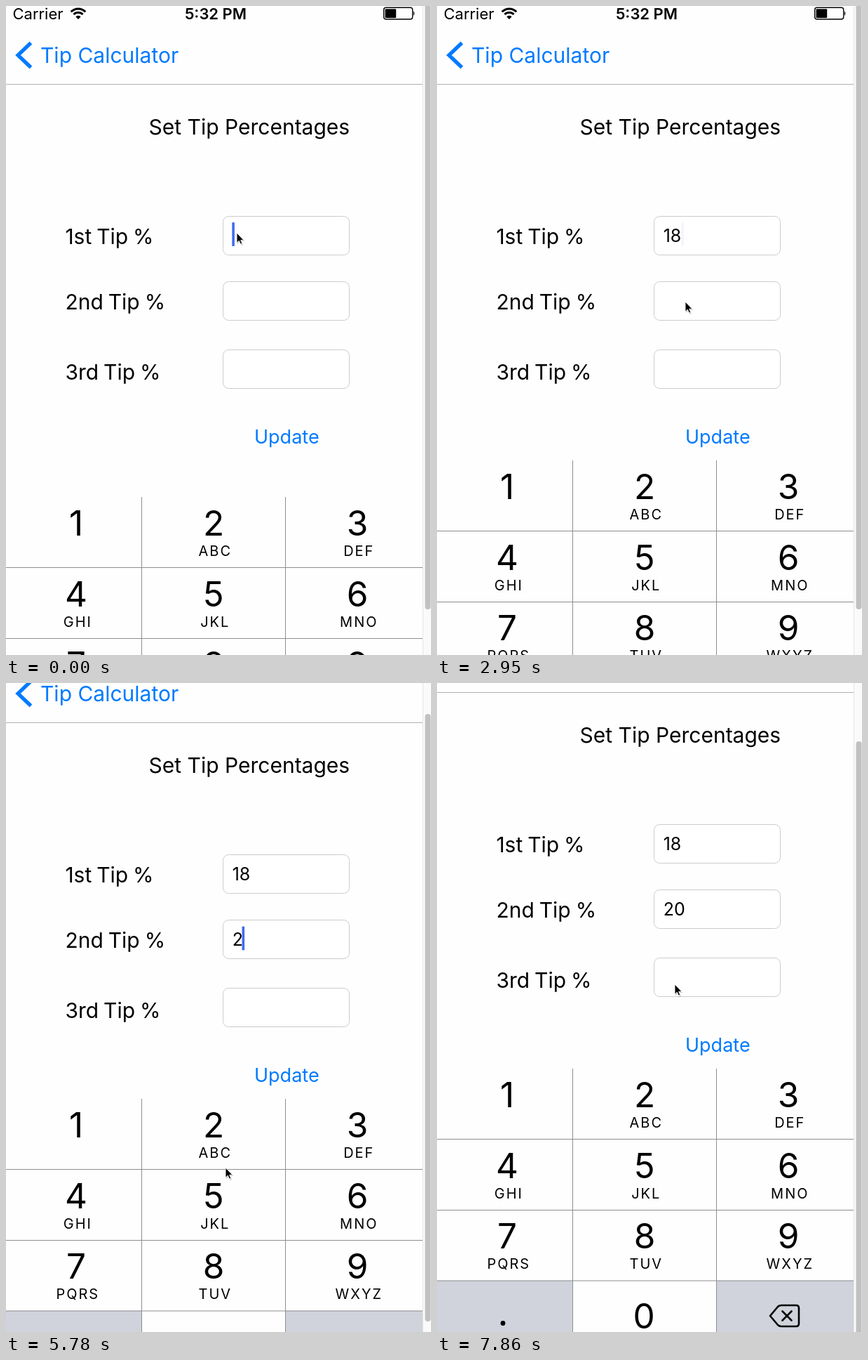
An HTML page for the animation above (8000 ms loop, 606x924 px).

```html
<!DOCTYPE html>
<html lang="en">
<head>
<meta charset="utf-8">
<title>Set Tip Percentages</title>
<style>
  html, body { margin: 0; width: 100%; height: 100%; overflow: hidden; background: #fefefe; }
  svg { display: block; width: 606px; height: 924px; }
  text {
    font-family: Inter, Roboto, "Liberation Sans", sans-serif;
    font-size: 30px;
    font-optical-sizing: none;
    white-space: pre;
  }
  .status { font-size: 22px; }
  .clock { font-weight: 600; text-anchor: middle; }
  .blue { fill: #007aff; }
  .update { font-size: 27px; }
  .label { word-spacing: -1.5px; }
  .entry { font-size: 25px; }
  .field { fill: #fff; stroke: #ccc; }
  .digit { font-size: 49.5px; text-anchor: middle; }
  .letters { font-size: 20px; letter-spacing: 2px; text-anchor: middle; }
  .grid { stroke: #8e8e90; fill: none; }
  .caret { fill: #426bf2; }
  .line { fill: none; stroke: #000; }
</style>
</head>
<body>
<svg viewBox="0 0 606 924">
  <rect width="606" height="924" fill="#fefefe"/>
  <g id="page">
    <text class="status" x="9.5" y="19">Carrier</text>
    <g class="line" stroke-width="3">
      <path d="M92.7 8.2a14.6 14.6 0 0 1 20.6 0M96.5 12a9.2 9.2 0 0 1 13 0"/>
      <path d="M103 19l-3.6-3.8a5.2 5.2 0 0 1 7.2 0z" fill="#000" stroke="none"/>
    </g>
    <text class="status clock" x="299" y="19">5:32 PM</text>
    <rect class="line" x="538.7" y="2.2" width="41" height="16.6" rx="3" stroke-width="1.4"/>
    <rect x="540.6" y="4.2" width="15.6" height="12.8" rx="1"/>
    <path d="M581 7q2.6 3.5 0 7z"/>
    <path d="M35.5 52.5L17 70L35.5 87.5" fill="none" stroke="#007aff" stroke-width="5.2"/>
    <text class="blue" x="49" y="81">Tip Calculator</text>
    <path d="M0 111.5H594" stroke="#b2b2b4"/>
    <text x="203.6" y="182.5">Set Tip Percentages</text>
    <g id="rows"></g>
    <text class="blue update" x="354" y="623">Update</text>
    <rect class="caret" id="caret" width="3.6" height="34" rx="1"/>
    <g id="keypad"></g>
  </g>
  <rect x="594" width="12" height="924" fill="#fafafa"/>
  <path d="M594.5 0V924" stroke="#e6e6e6"/>
  <rect id="thumb" x="597.5" width="8" height="865" rx="4" fill="#c1c1c1"/>
  <g id="pointer">
    <path d="M1 2V16L4.5 13L6.5 18L9 17L7 12H11.5Z" fill="#000" opacity=".2"/>
    <path d="M0 0V14.2L3.3 11.2L5.4 16L7.7 15L5.7 10.4H10Z" stroke="#fff" stroke-width=".9"/>
  </g>
</svg>
<script>
const LOOP = 8000, FRAMES = 54, STEP = LOOP / FRAMES;
const $ = id => document.getElementById(id);

function add(parent, tag, attrs, text = '') {
  const el = document.createElementNS('http://www.w3.org/2000/svg', tag);
  for (const name in attrs) el.setAttribute(name, attrs[name]);
  el.textContent = text;
  return parent.appendChild(el);
}

// Form rows: label, label baseline, box top
const entries = [['1st Tip %', 339, 299.5], ['2nd Tip %', 432, 392.5], ['3rd Tip %', 532, 489.5]]
  .map(([label, base, top]) => {
    add($('rows'), 'text', { class: 'label', x: 84.4, y: base }, label);
    add($('rows'), 'rect', { class: 'field', x: 309.5, y: top, width: 180, height: 55, rx: 8 });
    return add($('rows'), 'text', { class: 'entry', x: 322.7, y: top + 36 });
  });

// Keypad, drawn from its own top edge
const pad = $('keypad'), ROW = 100.6, KEY_GREY = '#d0d3db';
const edges = [0, 193.5, 398.5, 594], centers = [100, 296, 501];
const letters = ['', 'ABC', 'DEF', 'GHI', 'JKL', 'MNO', 'PQRS', 'TUV', 'WXYZ'];
const cells = [];
add(pad, 'rect', { width: 594, height: 420, fill: '#fefefe' });
for (let i = 0; i < 12; i++) {
  const col = i % 3, row = Math.floor(i / 3);
  cells.push(add(pad, 'rect', {
    x: edges[col], y: row * ROW, width: edges[col + 1] - edges[col],
    height: row < 3 ? ROW : 118, fill: KEY_GREY
  }));
}
add(pad, 'path', { class: 'grid', d: 'M193.5 0V420M398.5 0V420M0 100.5H594M0 201.5H594M0 302H594' });
letters.forEach((word, i) => {
  const x = centers[i % 3], y = Math.floor(i / 3) * ROW;
  add(pad, 'text', { class: 'digit', x, y: y + 55 }, i + 1);
  add(pad, 'text', { class: 'letters', x: x + 2.3, y: y + 84 }, word);
});
add(pad, 'circle', { cx: 94, cy: 362.5, r: 3.4 });
add(pad, 'text', { class: 'digit', x: 295, y: 370 }, '0');
add(pad, 'path', {
  class: 'line', 'stroke-width': 2.6, 'stroke-linejoin': 'round', 'stroke-linecap': 'round',
  d: 'M475 352L486 339Q488 337 491 337H512Q516 337 516 341V363Q516 367 512 367H491Q488 367 486 365ZM492.5 345.5L505.5 358.5M505.5 345.5L492.5 358.5'
});

// Timelines, in steps of the loop
const path = [
  [0, 329, 323], [2, 329, 323], [7, 100, 711], [11, 100, 711], [14, 267, 886], [16, 267, 886],
  [20, 354, 421], [27, 354, 421], [32, 313, 688], [35, 313, 688], [36, 313, 690], [41, 313, 690],
  [44, 294, 887], [48, 294, 887], [51, 354, 404], [52, 354, 404], [53, 339, 429]
];
const first = [[0, ''], [10, '1'], [15, '18']];
const second = [[0, ''], [35, '2'], [46, '20']];
const carets = [[322.3, 334, 348.4], [322.3, 336.5, 352]];
const blink = [[0, 1], [4, 0], [6, 1], [12, 0], [14, 1], [19, .4], [20, .06], [23, 1],
  [29, 0], [32, 1], [40, 0], [43, 1], [50, 0]];
const scroll = [[0, 0], [39, 55], [40, 88], [41, 98]];
const rise = [[0, 52], [1, 6], [2, 0]];
const presses = [[0, 9, 11], [7, 14, 16], [1, 33, 36], [10, 45, 47]]; // cell, from, to

const held = (track, k) => track.filter(p => p[0] <= k).pop()[1];

function along(track, k) {
  const i = track.findIndex(p => p[0] > k);
  if (i < 0) return track[track.length - 1].slice(1);
  const a = track[i - 1], b = track[i];
  const u = (k - a[0]) / (b[0] - a[0]), e = u * u * (3 - 2 * u);
  return [a[1] + (b[1] - a[1]) * e, a[2] + (b[2] - a[2]) * e];
}

const move = (id, x, y) => $(id).setAttribute('transform', `translate(${x} ${y})`);

function draw(k) {
  const top = held(scroll, k), texts = [held(first, k), held(second, k)];
  move('page', 0, -top);
  move('thumb', 0, -6 + top * .907);
  move('keypad', 0, 647 + held(rise, k));
  move('pointer', ...along(path, k));
  texts.forEach((s, i) => { entries[i].textContent = s; });
  const active = k < 26 ? 0 : 1;
  move('caret', carets[active][texts[active].length], active ? 401.5 : 308);
  $('caret').setAttribute('opacity', held(blink, k));
  cells.forEach((cell, i) => {
    const down = presses.some(([key, from, to]) => key === i && k >= from && k < to);
    cell.setAttribute('opacity', down || i === 9 || i === 11 ? 1 : 0);
  });
}

const LEAD = 15; // steps start slightly ahead of an even division
const start = performance.now();
function tick() {
  const t = (performance.now() - start) % LOOP;
  draw(Math.min(FRAMES - 1, Math.floor((t + LEAD) / STEP)));
  requestAnimationFrame(tick);
}
tick();
</script>
</body>
</html>
```
